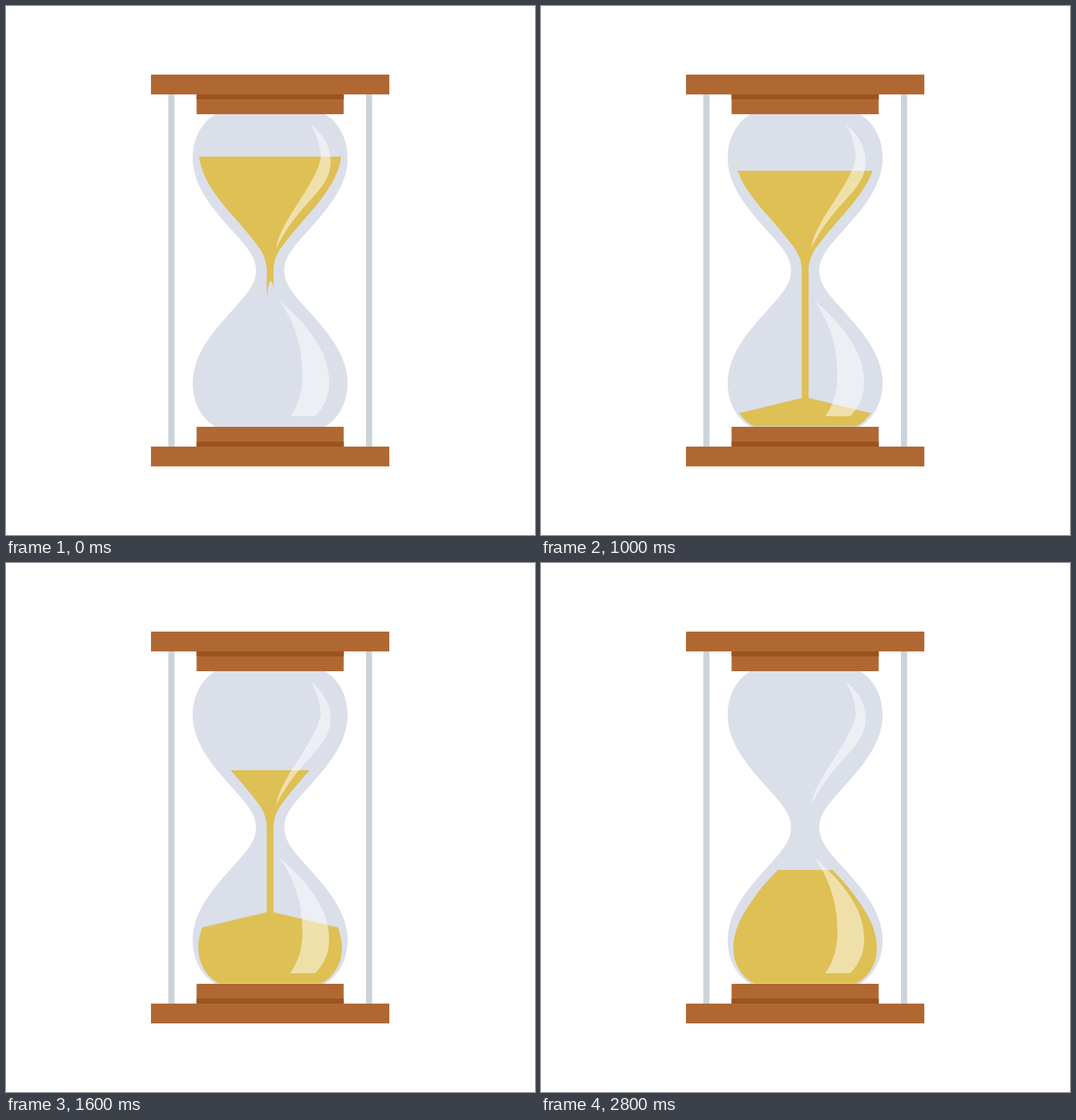
These frames come from a looping animation (748 px wide and 748 px high, 3 s). An HTML page without scripts:

```html
<!DOCTYPE html>
<html lang="en">
<head>
<meta charset="utf-8">
<title>Hourglass</title>
<style>
  html, body { margin: 0; width: 100%; height: 100%; overflow: hidden; background: #fff; }
  svg { display: block; width: 100%; height: 100%; }
  .rod { fill: #cad4d8; }
  .wood { fill: #b06833; }
  .shade { fill: #9c531f; }
  .glass { fill: #dbdfea; }
  .sand { fill: #dec055; }
  .shine { fill: #fff; fill-opacity: .5; }

  /* every motion ticks once per 200 ms, 15 ticks per loop */
  .drain, .fall, .rise, .cone, .splash { animation: 3s step-end infinite; }
  .drain { animation-name: drain; }
  .fall { animation-name: fall; }
  .rise { animation-name: rise; }
  .cone { animation-name: cone; }
  .splash { animation-name: splash; }

  @keyframes drain {
    0% { transform: translateY(213px); }
    26.667% { transform: translateY(218px); }
    33.333% { transform: translateY(233px); animation-timing-function: steps(10); }
    100% { transform: translateY(435px); }
  }
  @keyframes fall {
    0% { transform: scaleY(1); animation-timing-function: steps(4); }
    26.66% { transform: scaleY(2.65); }
    26.667% { transform: scaleY(4); }
    93.333%, 100% { transform: scaleY(0); }
  }
  @keyframes rise {
    0% { transform: translateY(600px); }
    26.667% { transform: translateY(590px); }
    33.333% { transform: translateY(575px); animation-timing-function: steps(7); }
    80%, 100% { transform: translateY(434px); }
  }
  @keyframes cone {
    0% { transform: scale(0); }
    33.333% { transform: scale(.9, 1); }
    40% { transform: scale(1, 1); }
    46.667% { transform: scale(1, 1); animation-timing-function: steps(2); }
    60% { transform: scale(.855, 1); animation-timing-function: steps(3); }
    80% { transform: scale(.385, 1); animation-timing-function: steps(2); }
    93.333%, 100% { transform: scale(.385, 0); }
  }
  @keyframes splash {
    0% { visibility: hidden; }
    26.667% { visibility: visible; }
    33.333%, 100% { visibility: hidden; }
  }
</style>
</head>
<body>
<svg viewBox="0 0 748 748">
  <defs>
    <!-- left halves, mirrored about x = 373.5 -->
    <path id="wall" d="M380 153H296C276 165 264 188 264 215C264 258 298 293 322 320C340 340 353.5 355 353.5 374
      C353.5 393 340 408 322 428C298 455 264 490 264 533C264 560 276 583 296 595H380Z"/>
    <path id="funnel" d="M375 205H272.5L273 212C276 240 294 266 318 293.5C331 308 341 320 352 334C362 346 368.7 358 368.7 374V594H375Z"/>
    <path id="bulb" d="M380 400H369L335 434C322 447 311 459 301 474C290 489 272 515 272 544C272 567 284 586 301 594.3H380Z"/>
    <path id="drop" d="M0 0C-4 -4 -5 -7 -5 -9.5A5 5 0 0 1 5 -9.5C5 -7 4 -4 0 0Z"/>

    <clipPath id="upper">
      <use href="#funnel"/>
      <use href="#funnel" transform="matrix(-1 0 0 1 747 0)"/>
    </clipPath>
    <clipPath id="lower">
      <use href="#bulb"/>
      <use href="#bulb" transform="matrix(-1 0 0 1 747 0)"/>
    </clipPath>
    <clipPath id="level">
      <rect class="drain" x="200" width="348" height="500"/>
    </clipPath>
  </defs>

  <g class="rod">
    <rect x="229.5" y="125" width="8.7" height="498"/>
    <rect x="509" y="125" width="8.7" height="498"/>
  </g>

  <g class="glass">
    <use href="#wall"/>
    <use href="#wall" transform="matrix(-1 0 0 1 747 0)"/>
  </g>

  <g class="sand">
    <!-- upper sand and the stream, whose tip stretches as it falls -->
    <g clip-path="url(#level)">
      <g clip-path="url(#upper)">
        <g transform="translate(0 290)">
          <path class="fall" d="M200 -200H548V113H378.5Q377 99 374.5 98.5Q371 100 369 122L368 113H200Z"/>
        </g>
      </g>
    </g>

    <g clip-path="url(#lower)">
      <g class="rise">
        <rect x="260" width="227" height="200"/>
        <g transform="translate(373.5 0)">
          <path class="cone" d="M-100 .5V0L0 -22L100 0V.5Z"/>
        </g>
      </g>
    </g>

    <g class="splash">
      <use href="#drop" transform="translate(356.5 581.5) rotate(-42) scale(.85)"/>
      <use href="#drop" transform="translate(388.5 572) rotate(32)"/>
      <use href="#drop" transform="translate(385 585) rotate(45) scale(.5)"/>
    </g>
  </g>

  <g class="shine">
    <path d="M431 168C448 181 459 198 459 220C459 262 415 275 382 343C386 306 436 256 445 216C445 199 440 183 431 168Z"/>
    <path d="M387 417C428 452 457 490 457 531C457 551 450 568 437 580H402C414 563 420 542 419 518C419 482 408 447 387 417Z"/>
  </g>

  <g class="wood">
    <rect x="205" y="97" width="337" height="28"/>
    <rect x="269.5" y="125" width="208" height="28"/>
    <rect x="269.5" y="595" width="208" height="28"/>
    <rect x="205" y="623" width="337" height="28"/>
  </g>
  <g class="shade">
    <rect x="269.5" y="125" width="208" height="7"/>
    <rect x="269.5" y="616" width="208" height="7"/>
  </g>
</svg>
</body>
</html>
```
